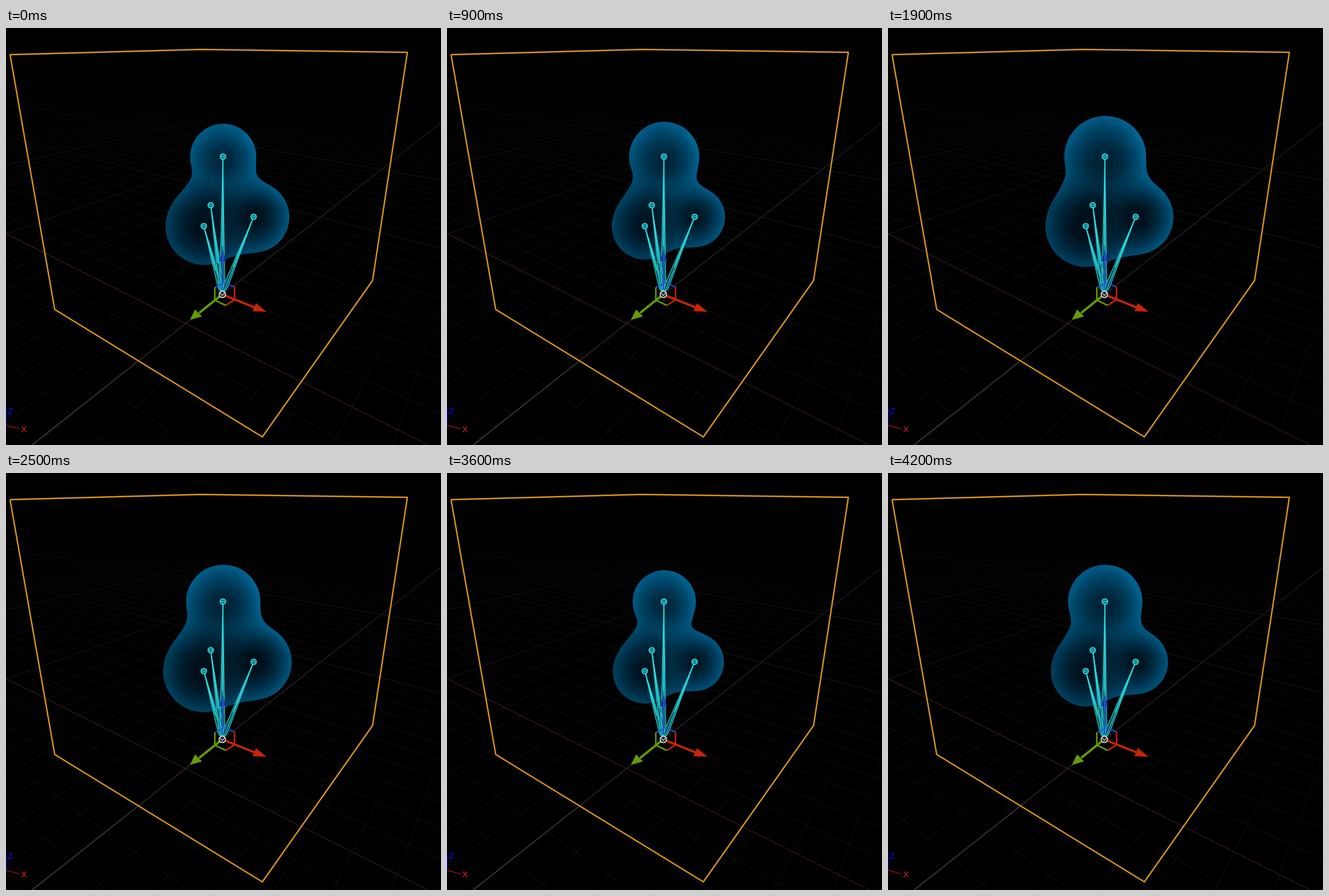
These frames come from a looping animation (750 px wide and 720 px high, 4300 ms). An HTML page with a canvas:

```html
<!DOCTYPE html>
<html>
<head>
<meta charset="utf-8">
<style>
html, body { margin: 0; height: 100%; overflow: hidden; background: #000; }
canvas { display: block; }
</style>
</head>
<body>
<canvas id="stage" width="750" height="720"></canvas>
<script>
const LOOP = 4300, STEP = 100;
const ctx = document.getElementById('stage').getContext('2d');

// Radius of the top and left balls over time (seconds)
const times = [0, 0.4, 0.9, 1.4, 1.9, 2.5, 3.1, 3.6, 4.2];
const topRadius = [57, 55.5, 60.5, 68, 70.5, 64, 55, 54.5, 64];
const leftRadius = [66.5, 60, 57.3, 63, 70, 70.5, 64, 55.5, 60.7];

const base = [373, 460];
const joints = { top: [374, 222], left: [341, 342], back: [353, 306], right: [427, 326] };
const area = { x: 250, y: 135, w: 265, h: 295 };
const BLEND = 42;

const clamp = v => Math.max(0, Math.min(1, v));
const mix = (p, q, k) => [p[0] + (q[0] - p[0]) * k, p[1] + (q[1] - p[1]) * k];

function makeCanvas(w, h) {
  const c = document.createElement('canvas');
  c.width = w;
  c.height = h;
  return c;
}

// Smooth curve through the keyed values
function curve(keys, t) {
  const last = times.length - 1;
  let i = 0;
  while (i < last - 1 && t > times[i + 1]) i++;
  const slope = n => {
    const a = Math.max(0, n - 1), b = Math.min(last, n + 1);
    return (keys[b] - keys[a]) / (times[b] - times[a]);
  };
  const d = times[i + 1] - times[i], u = (t - times[i]) / d, w = 1 - u;
  return keys[i] * w * w * (1 + 2 * u) + keys[i + 1] * u * u * (3 - 2 * u)
    + d * u * w * (slope(i) * w - slope(i + 1) * u);
}

function smoothMin(a, b) {
  const h = Math.max(0, BLEND - Math.abs(a - b)) / BLEND;
  return Math.min(a, b) - h * h * BLEND / 4;
}

function path(c, points, color, width) {
  c.beginPath();
  for (const p of points) c.lineTo(...p);
  c.strokeStyle = color;
  c.lineWidth = width;
  c.stroke();
}

function fill(c, points, color) {
  c.beginPath();
  for (const p of points) c.lineTo(...p);
  c.fillStyle = color;
  c.fill();
}

function drawGrid(c) {
  const origin = [310, 510], vanishX = [-693, 8], vanishY = [913, 28];
  const family = (toward, across, step) => {
    for (let j = -10; j <= 28; j++) {
      if (!j) continue;
      const s = j * step;
      const p = mix(origin, across, s / (1 + s));
      const shade = j % 10 ? Math.round(17 - Math.max(0, j) * 0.4) : 27;
      const near = mix(p, toward, -3), far = mix(p, toward, 0.8);
      const g = c.createLinearGradient(...p, ...far);
      g.addColorStop(0, `rgb(${shade},${shade},${shade})`);
      g.addColorStop(1, '#000');
      path(c, [near, far], g, 1);
    }
  };
  family(vanishX, vanishY, 0.0617);
  family(vanishY, vanishX, 0.0445);
  path(c, [[0, 355], [728, 720]], '#3b1b1b', 1.2);
  const gray = c.createLinearGradient(45, 720, 750, 163);
  gray.addColorStop(0, '#505050');
  gray.addColorStop(0.25, '#444');
  gray.addColorStop(0.28, '#3a2a2a');
  gray.addColorStop(0.39, '#382c2c');
  gray.addColorStop(0.4, '#303030');
  gray.addColorStop(1, '#1c1c1c');
  path(c, [[45, 720], [310, 510], [750, 163]], gray, 1.3);
}

function drawFrame(c) {
  c.lineJoin = 'round';
  const box = [[7, 46], [335, 37], [692, 42], [632, 436], [442, 706], [84, 486], [7, 46]];
  path(c, box, '#d8961c', 2.4);
  c.font = '15px "Liberation Sans", Arial, sans-serif';
  path(c, [[0, 657], [0, 686]], '#0000e0', 2);
  path(c, [[0, 686], [23, 692]], '#d01818', 1.2);
  c.fillStyle = '#0c0cf0';
  c.fillText('Z', 3, 666);
  c.fillStyle = '#e02020';
  c.fillText('X', 26, 698);
}

function drawBone(c, joint) {
  const cyan = '#27d9da';
  const dx = joint[0] - base[0], dy = joint[1] - base[1], len = Math.hypot(dx, dy);
  const waist = mix(base, joint, 0.1);
  const side = k => [waist[0] - dy / len * k, waist[1] + dx / len * k];
  fill(c, [joint, side(4), base, side(-4)], 'rgba(20,130,145,.55)');
  for (const k of [-4, 0.8, 4]) path(c, [joint, side(k), base], cyan, 1.2);
  path(c, [joint, mix(base, joint, 0.35)], cyan, 2);
  c.beginPath();
  c.arc(...joint, 4.6, 0, 7);
  c.fillStyle = '#0b6f80';
  c.fill();
  c.strokeStyle = cyan;
  c.lineWidth = 2;
  c.stroke();
  path(c, [[joint[0] - 3, joint[1]], [joint[0] + 3, joint[1]]], cyan, 1.3);
}

function drawRig(c) {
  Object.values(joints).forEach(j => drawBone(c, j));
  const red = '#c62506', green = '#629c08', blue = '#2450d8';
  path(c, [[373, 452], [373, 400]], '#2348c4', 2.5);
  fill(c, [[374, 384], [380, 403], [367, 403]], 'rgba(22,45,165,.85)');
  path(c, [[374, 388], [374, 404]], '#3f7fe8', 1);
  path(c, [[360, 448], [376, 440], [394, 447]], blue, 2);
  path(c, [[360, 448], [360, 470], [379, 479]], green, 2.6);
  path(c, [[394, 447], [394, 469], [379, 479]], red, 2.6);
  path(c, [[375, 461], [430, 483]], red, 4);
  fill(c, [[449, 490], [431, 475], [425, 489]], red);
  path(c, [[369, 463], [333, 492]], green, 4);
  fill(c, [[317, 504], [326, 486], [338, 498]], green);
  c.beginPath();
  c.arc(...base, 5.5, 0, 7);
  c.fillStyle = '#222';
  c.fill();
  c.strokeStyle = '#e4e4e4';
  c.lineWidth = 1.7;
  c.stroke();
  path(c, [[369, 457], [373, 462], [377, 457]], '#ddd', 1.2);
}

const blob = makeCanvas(area.w, area.h);
const blobCtx = blob.getContext('2d');
const image = blobCtx.createImageData(area.w, area.h);

function drawBlob(t) {
  const top = curve(topRadius, t), left = curve(leftRadius, t);
  const radii = { top, left, back: (top + left) / 2 - 24, right: left - 5.5 };
  const balls = Object.keys(joints).map(k => [...joints[k], radii[k]]);
  const data = image.data;
  for (let i = 0, o = 0; i < area.w * area.h; i++, o += 4) {
    const x = area.x + i % area.w, y = area.y + Math.floor(i / area.w);
    let d = 1e3;
    for (const [bx, by, r] of balls) d = smoothMin(d, Math.hypot(x - bx, y - by) - r);
    data[o + 3] = 245 * clamp(0.5 - d);
    if (d > 0.5) continue;
    const rim = clamp(1 + d / 62) ** 1.7;
    const light = 25 + 76 * rim + 42 * clamp((310 - y) / 115)
      + 32 * rim * clamp((x - 370) / 100);
    data[o] = 0;
    data[o + 1] = light * 0.7 - 3;
    data[o + 2] = light;
  }
  blobCtx.putImageData(image, 0, 0);
  ctx.drawImage(blob, area.x, area.y);
}

const back = makeCanvas(750, 720), front = makeCanvas(750, 720);
drawGrid(back.getContext('2d'));
drawFrame(back.getContext('2d'));
drawRig(front.getContext('2d'));

let shown = -1;
function render() {
  const tick = Math.floor(performance.now() % LOOP / STEP);
  if (tick !== shown) {
    shown = tick;
    ctx.fillStyle = '#000';
    ctx.fillRect(0, 0, 750, 720);
    ctx.drawImage(back, 0, 0);
    drawBlob(tick * STEP / 1000);
    ctx.drawImage(front, 0, 0);
  }
  requestAnimationFrame(render);
}
render();
</script>
</body>
</html>
```
